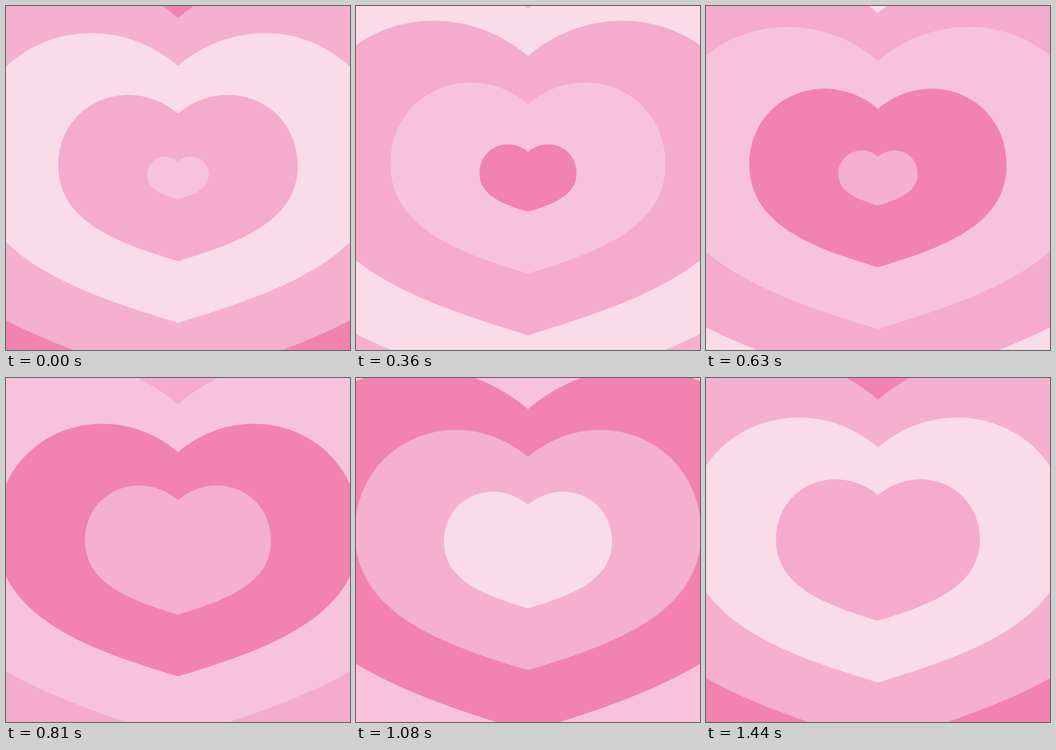
An HTML page with a canvas for the animation above (1530 ms loop, 500x500 px).

```html
<!DOCTYPE html>
<html lang="en">
<head>
<meta charset="utf-8">
<title>Growing hearts</title>
<style>
  html, body { margin: 0; overflow: hidden; }
  canvas { display: block; }
</style>
</head>
<body>
<canvas id="stage" width="500" height="500"></canvas>
<script>
const ctx = document.getElementById('stage').getContext('2d');
const COLORS = ['#f7c3da', '#f183ae', '#f5b0cd', '#f9dce7', '#f5abcc'];
const LOOP = 1530, STEP = 90;   // ms
const BIRTH = 300;              // ms between new hearts
const START = 31;               // half height of a new heart
const GAP = 89.75;              // half-height growth per BIRTH

// Right half of a heart of half height 1: notch, lobe top, side, tip
const heart = new Path2D(
  'M0-.775 C.17-.92 .38-1 .6-1 C1.055-1 1.441-.655 1.441-.145 C1.441.535 .7.788 0 1'
);
heart.addPath(new Path2D(heart), new DOMMatrix().scale(-1, 1));

function drawHeart(size, color) {
  ctx.setTransform(size, 0, 0, size, 250, 250);
  ctx.fillStyle = color;
  ctx.fill(heart);
}

function draw(now) {
  const time = Math.floor(now % LOOP / STEP) * STEP;
  const newest = Math.floor(time / BIRTH);
  const growth = time / BIRTH - newest;
  const count = COLORS.length;
  for (let age = count - 1; age >= 0; age--) {
    drawHeart(START + GAP * (growth + age), COLORS[(newest - age + count) % count]);
  }
}

const begin = performance.now();
function tick() {
  draw(performance.now() - begin);
  requestAnimationFrame(tick);
}
tick();
</script>
</body>
</html>
```
